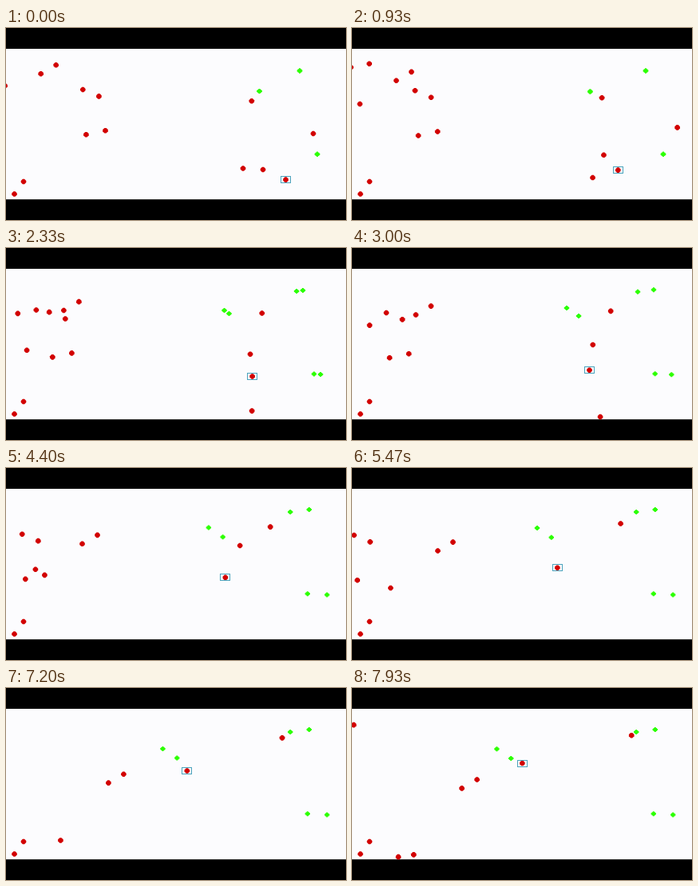
An HTML page for the animation above (8000 ms loop, 426 px wide and 240 px high).

```html
<!DOCTYPE html>
<html lang="en">
<head>
<meta charset="utf-8">
<title>Moving dots</title>
<style>
  html, body { margin: 0; width: 100%; height: 100%; overflow: hidden; background: #000; }
  svg { display: block; width: 100%; height: 100%; }
</style>
</head>
<body>
<svg id="stage" viewBox="0 0 426 240">
  <rect y="26" width="426" height="188.2" fill="#fcfcfe"/>
  <g id="dots"></g>
  <rect id="box" width="12" height="8" fill="none" stroke="#4ba3bd"/>
  <rect width="426" height="26"/>
  <rect y="215" width="426" height="25"/>
</svg>
<script>
const LOOP = 8, FPS = 15;
const RED = '#d20000', GREEN = '#2cff00';
const ROUND = 'M-1.1-3.3H1.1L3.3-1.1V1.1L1.1 3.3H-1.1L-3.3 1.1V-1.1Z';
const CROSS = 'M-1-3H1V-2H2.2V-1H3.2V1H2.2V2H1V3H-1V2H-2.2V1H-3.2V-1H-2.2V-2H-1Z';

// Dots that share a heading move together at a steady speed.
const tracked = { x: 350.5, y: 189.6, vx: -17.3, vy: -12.05 };
const reds = [
  tracked,
  ...convoy(0, 0, { x: 22, y: 192 }, { x: 10.5, y: 207.5 }),
  ...convoy(11.85, 8.6, { x: 43.7, y: 57.2 }, { x: 62.7, y: 46.3 }),
  ...convoy(-17.4, 1.3,
    { x: 96.3, y: 77 }, { x: 116.4, y: 85.4 },
    { x: 100.4, y: 133.2 }, { x: 124.5, y: 128.2, until: 4.6 }),
  ...convoy(11.35, 22.97,
    { x: -12.7, y: 26.3 }, { x: -31.9, y: 29, from: 7.4 }, { x: -87.8, y: -136 },
    { x: -1.4, y: 72.2, until: 2.7 }, { x: 10.4, y: 21.9, until: 2.7 }),
  ...convoy(5.35, -4.05, { x: 307.8, y: 91.3 }),
  ...convoy(22.8, -7.7, { x: 385, y: 132 }),
  ...convoy(-6.6, -18.3, { x: 322, y: 177, until: 5.4 }),
  ...convoy(4.6, 11.6, { x: 297, y: 175.5 })
];

// Green dots split into two along (dx, dy).
const gates = [
  { x: 368, y: 53.5, vx: 0, vy: 0, dx: 11.8, dy: -1.4 },
  { x: 390, y: 157.8, vx: 0, vy: 0, dx: 12.2, dy: 0.6 },
  { x: 317.5, y: 79, vx: -20.5, vy: 0.5, dx: 8.9, dy: 5.8 }
];

function convoy(vx, vy, ...dots) {
  return dots.map(d => ({ ...d, vx, vy }));
}

const layer = document.getElementById('dots');
const box = document.getElementById('box');

function dot(d, fill) {
  const el = document.createElementNS('http://www.w3.org/2000/svg', 'path');
  el.setAttribute('d', d);
  el.setAttribute('fill', fill);
  return layer.appendChild(el);
}

for (const gate of gates) gate.pair = [-1, 1].map(side => ({ side, el: dot(CROSS, GREEN) }));
for (const red of reds) red.el = dot(ROUND, RED);

const along = (m, t) => [m.x + m.vx * t, m.y + m.vy * t];

function place(el, x, y) {
  el.setAttribute('transform', `translate(${x.toFixed(2)} ${y.toFixed(2)})`);
}

function render(t) {
  // The pace runs a little ahead early on and lags later.
  const pace = t + 0.09 * Math.sin(2 * Math.PI * t / LOOP);
  for (const red of reds) {
    const { el, from = 0, until = LOOP } = red;
    el.setAttribute('visibility', t >= from && t <= until ? 'visible' : 'hidden');
    place(el, ...along(red, pace));
  }

  // Gates rest while they open.
  const travel = Math.min(t, 2) + Math.max(0, t - 3.73);
  const open = Math.min(1, Math.max(0, (t - 1.9) / 1.3));
  for (const gate of gates) {
    const [x, y] = along(gate, travel);
    for (const { side, el } of gate.pair) {
      place(el, x + side * gate.dx * open, y + side * gate.dy * open);
    }
  }

  const [x, y] = along(tracked, pace);
  place(box, Math.round(x - 6.5) + 0.5, Math.round(y - 4.5) + 0.5);
}

function tick(now) {
  const t = (now / 1000) % LOOP;
  render(Math.floor((t + 0.004) * FPS) / FPS);
  requestAnimationFrame(tick);
}

render(0);
requestAnimationFrame(tick);
</script>
</body>
</html>
```
